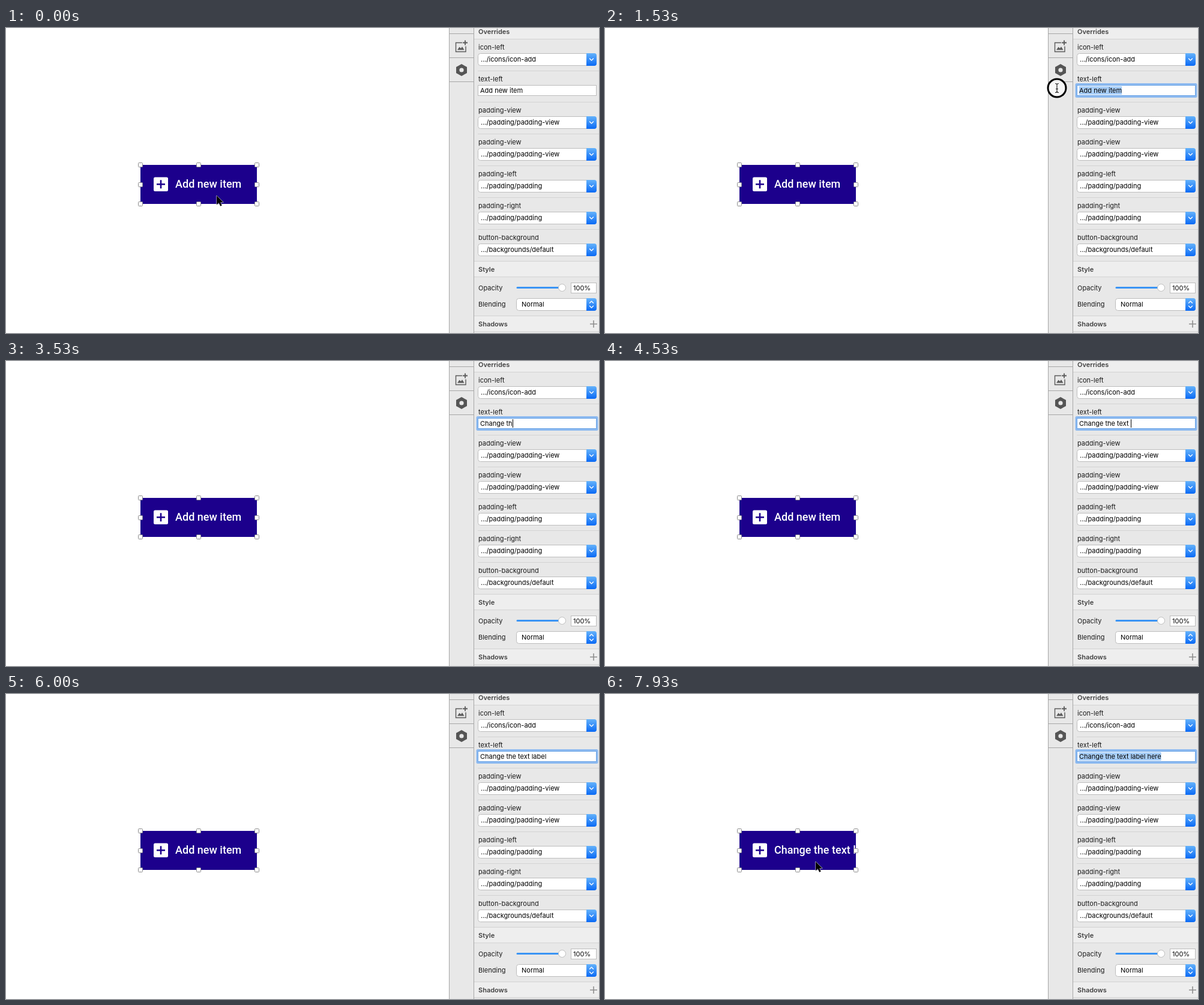
An HTML page for the animation above (8 s loop, 988 by 508 pixels).

```html
<!DOCTYPE html>
<html lang="en">
<head>
<meta charset="utf-8">
<title>Text override</title>
<style>
  html, body { margin: 0; width: 100%; height: 100%; overflow: hidden; background: #fff; }
  svg { display: block; width: 988px; height: 508px; }
  text { font: 11px Inter, "Open Sans", sans-serif; fill: #1a1a1a; white-space: pre; }
  .head { font-weight: 600; fill: #404040; }
  .value { fill: #000; }
  #caption { font: 500 18px Roboto, sans-serif; fill: #fff; }
  .rule { stroke: #d3d3d3; }
  .edge { stroke: #a6a6a6; }
  .box { fill: #fff; stroke: #bdbdbd; }
  .chevron { fill: none; stroke: #fff; stroke-width: 1.4; stroke-linecap: round; stroke-linejoin: round; }
  .handle { fill: #fff; stroke: #8c8c8c; }
</style>
</head>
<body>
<svg viewBox="0 0 988 508">
  <defs>
    <linearGradient id="cap" x2="0" y2="1">
      <stop stop-color="#64b2fb"/><stop offset="1" stop-color="#0a6af5"/>
    </linearGradient>
    <clipPath id="buttonClip"><rect x="224" y="228" width="194" height="65"/></clipPath>
  </defs>
  <rect width="988" height="508" fill="#fff"/>

  <g clip-path="url(#buttonClip)">
    <rect x="224" y="228" width="194" height="65" fill="#1c008c"/>
    <rect x="246" y="248.5" width="24" height="23.5" rx="2.5" fill="#fff"/>
    <path d="M251 260.3h14M258 253.3v14" stroke="#1c008c" stroke-width="2.6"/>
    <text id="caption" x="282" y="266"></text>
  </g>
  <g id="handles"></g>

  <rect x="738" width="250" height="508" fill="#e8e8e8"/>
  <path class="edge" d="M738.5 0v508M779.5 0v508M739 9.5h40M739 49.5h40M739 89.5h40"/>
  <g fill="none" stroke="#5a5a5a" stroke-width="1.4">
    <path d="M760 24.5h-10.5v15h16.500v-9"/>
    <path d="M765 20.500v8M761 24.500h8" stroke-width="1.8"/>
    <path d="M752 36.500l3.500-5 2.500 2.500 2-3 3.500 5.500z" fill="#5a5a5a" stroke="none"/>
  </g>
  <path d="M759 60l9 5v10l-9 5-9-5v-10z" fill="#555"/>
  <circle cx="759" cy="70" r="3.6" fill="#e8e8e8"/>
  <g id="panel"></g>

  <rect id="focus" x="783.5" y="92" width="203" height="24" rx="2.5" fill="#8dbaf0"/>
  <rect id="field" x="786.5" y="95.5" width="197" height="17" fill="#fff"/>
  <rect id="selection" y="97" height="14" fill="#a8cef8"/>
  <text id="input" class="value" x="790" y="108"></text>
  <rect id="caret" y="97" width="1" height="14"/>

  <g id="ibeam">
    <circle id="press" r="15" fill="#fff" fill-opacity=".7" stroke="#000" stroke-width="3"/>
    <path d="M-3 -7.500q3 0 3 2v11q0 2-3 2M3 -7.500q-3 0-3 2M0 5.500q0 2 3 2M-2 1.500h4" fill="none" stroke="#222" stroke-width="1.2"/>
  </g>
  <path id="arrow" d="M0 0v15.500l3.600-3.400 2.500 5.600 2.600-1.100-2.400-5.400h4.800z" stroke="#fff" stroke-width="1" paint-order="stroke"/>
</svg>
<script>
const $ = id => document.getElementById(id);
const rect = (x, y, w, h, cls, rx = 0) =>
  `<rect x="${x}" y="${y}" width="${w}" height="${h}" class="${cls}" rx="${rx}"/>`;
const label = (x, y, str, cls = '') => `<text x="${x}" y="${y}" class="${cls}">${str}</text>`;
const rule = (y, x = 780) => `<path class="rule" d="M${x} ${y}.5H988"/>`;

function select(x, y, str, chevrons, indent = 5) {
  return rect(x + .5, y + .5, 983 - x, 20, 'box', 4)
    + `<path d="M967 ${y}h13q4 0 4 4v13q0 4-4 4h-13z" fill="url(#cap)"/>`
    + `<path class="chevron" d="${chevrons}"/>` + label(x + indent, y + 14, str, 'value');
}
const heading = (top, height, str) =>
  `<rect x="780" y="${top}" width="208" height="${height}" fill="#eee"/>`
  + (top > 0 ? rule(top) : '') + rule(top + height) + label(787, top + 18, str, 'head');

const rows = [
  ['icon-left', 'icons/icon-add', 32], ['text-left', '', 85],
  ['padding-view', 'padding/padding-view', 137], ['padding-view', 'padding/padding-view', 190],
  ['padding-left', 'padding/padding', 243], ['padding-right', 'padding/padding', 296],
  ['button-background', 'backgrounds/default', 349]
];
let panel = heading(-8, 26, 'Overrides') + heading(388, 26, 'Style') + heading(479, 26, 'Shadows');
rows.forEach(([name, value, y], i) => {
  if (i) panel += rule(y - 14, 786);
  panel += label(787, y + 4, name);
  panel += value ? select(786, y + 10, '.../' + value, `M972.500 ${y + 19}l3 3 3-3`)
                 : rect(786.5, 95.5, 197, 17, 'box');
});
panel += label(787, 437, 'Opacity')
  + '<path d="M852 432.500H924" stroke="#3a94f4" stroke-width="3" stroke-linecap="round"/>'
  + '<circle cx="926.500" cy="432.500" r="6" class="box"/>'
  + rect(941.5, 424.5, 42, 17, 'box') + label(945, 437, '100%', 'value')
  + label(787, 464, 'Blending') + select(850, 450, 'Normal', 'M972.500 458l3-3 3 3M972.500 463l3 3 3-3', 9)
  + '<path d="M973 493h12M979 487v12" stroke="#8e8e8e" stroke-width="1.600"/>';
$('panel').innerHTML = panel;

for (const x of [224, 321, 418])
  for (const y of [228, 260.5, 293])
    if (x !== 321 || y !== 260.5) $('handles').innerHTML += rect(x - 3.5, Math.round(y) - 3.5, 7, 7, 'handle', 1);

// Pointer path: time, x, y
const path = [
  [0, 351, 279], [200, 351, 279], [470, 500, 225], [730, 735, 140], [930, 858, 105],
  [1070, 866, 104], [1200, 866, 104], [1470, 753, 100], [2150, 753, 100],
  [7330, 753, 150], [7530, 716, 205], [7730, 632, 244], [7860, 578, 237], [7930, 565, 233]
];
const BEFORE = 'Add new item', AFTER = 'Change the text label here';
const LOOP = 8000, STEP = 1000 / 15;
const PRESS = 1130, RELEASE = 1665, TYPE = 2200, COMMIT = 6790;
// Runs of typing: start time, first letter, letter count
const runs = [[TYPE, 0, 16], [4620, 16, 5], [6060, 21, 5]];
const KEY = 150;

function pointerAt(t) {
  const i = Math.max(1, path.findIndex(p => p[0] >= t));
  const [a, b] = [path[i - 1], path[i]];
  const k = t > path.at(-1)[0] ? 1 : (t - a[0]) / (b[0] - a[0]);
  return [a[1] + (b[1] - a[1]) * k, a[2] + (b[2] - a[2]) * k];
}
function typing(t) {
  let count = 0, last = 0;
  for (const [start, first, size] of runs) {
    if (t < start) break;
    const n = Math.min(size, 1 + Math.floor((t - start) / KEY));
    count = first + n;
    last = start + (n - 1) * KEY;
  }
  return { count, last };
}
const show = (id, on) => $(id).setAttribute('visibility', on ? 'visible' : 'hidden');
const place = (id, x, y) => $(id).setAttribute('transform', `translate(${Math.round(x)} ${Math.round(y)})`);
const write = (id, str) => { if ($(id).textContent !== str) $(id).textContent = str; };

function draw(time) {
  const t = Math.floor(time % LOOP / STEP + .05) * STEP;
  const [x, y] = pointerAt(t);
  const { count, last } = typing(t);
  const focused = t >= PRESS, dragging = focused && t < RELEASE;
  const visible = t < 2150 || t >= 7330;
  const beam = t < RELEASE && (dragging || x > 786 && y > 95 && y < 113);

  write('caption', t >= COMMIT ? AFTER : BEFORE);
  write('input', t < TYPE ? BEFORE : AFTER.slice(0, count));
  const end = 790 + $('input').getComputedTextLength();
  const from = t >= TYPE ? 790 : Math.min(end, Math.max(790, x));
  const selected = t >= COMMIT || focused && t < TYPE && from < end;

  show('focus', focused);
  show('field', focused);
  $('field').setAttribute('stroke', '#69a3e6');
  show('selection', selected);
  $('selection').setAttribute('x', from);
  $('selection').setAttribute('width', Math.max(0, end - from));
  show('caret', focused && !selected && (t - last) % 1100 < 560);
  $('caret').setAttribute('x', Math.round(end));

  show('ibeam', visible && beam);
  show('press', dragging);
  show('arrow', visible && !beam);
  place('ibeam', x, y);
  place('arrow', x, y);
}
const origin = performance.now();
function frame() {
  draw(performance.now() - origin);
  requestAnimationFrame(frame);
}
frame();
</script>
</body>
</html>
```
